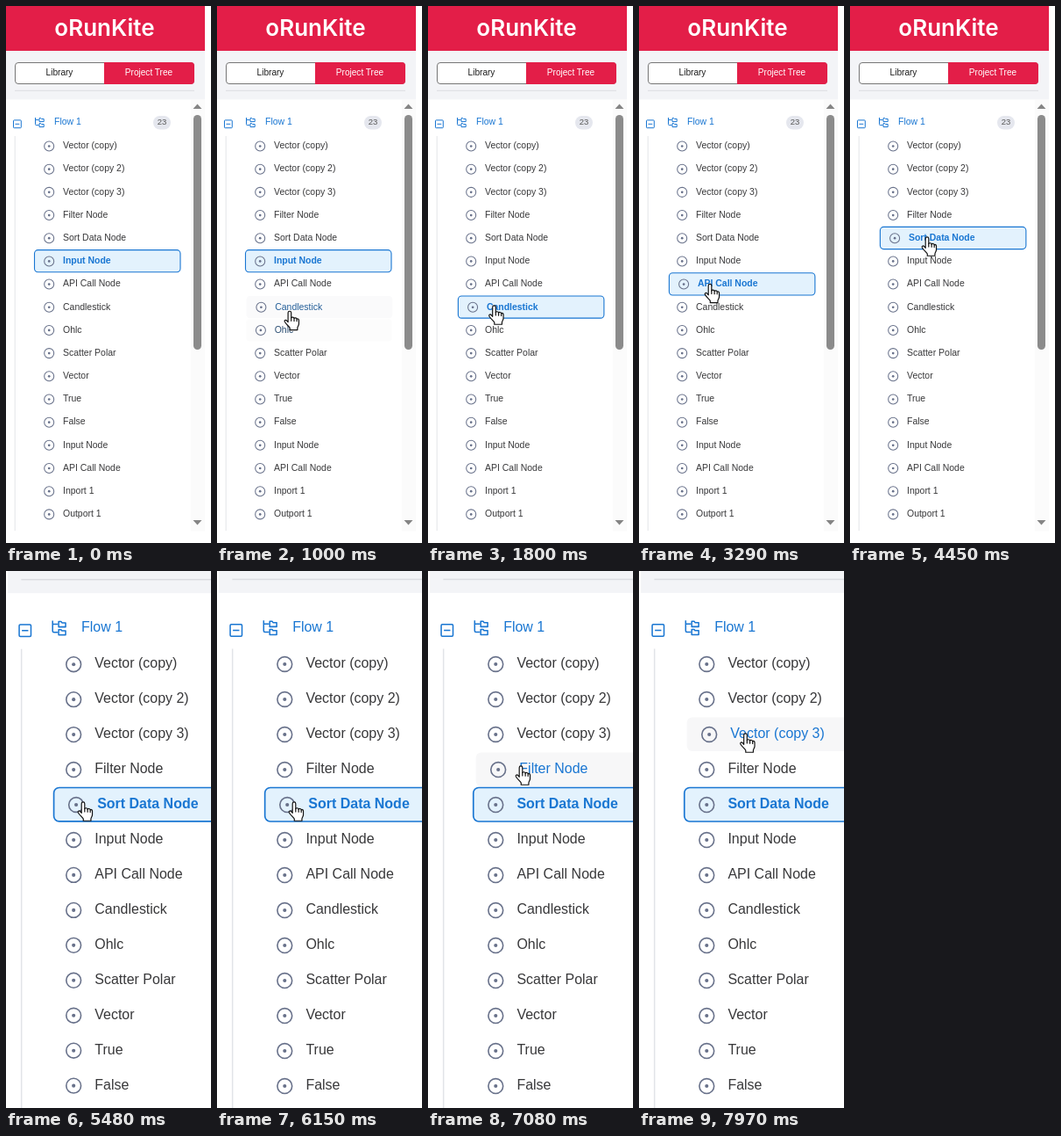
Write an HTML page that moves like this. It is 234 by 611 pixels and loops after 8 s.

```html
<!DOCTYPE html>
<html lang="en">
<head>
<meta charset="utf-8">
<title>Project tree</title>
<style>
  html, body { margin: 0; width: 100%; height: 100%; overflow: hidden; background: #fff; }
  svg { display: block; width: 234px; height: 611px; }
  text { font-family: "Liberation Sans", Arial, sans-serif; font-size: 10.47px; fill: #333; white-space: pre; }
  .title { font: 600 26px Inter, sans-serif; fill: #fff; }
  .mid { text-anchor: middle; }
  .tab { font-size: 10.1px; fill: #1c1c1c; }
  .blue { fill: #1976d2; }
  .line { fill: none; stroke: #1976d2; stroke-width: 1; stroke-linejoin: round; }
</style>
</head>
<body>
<svg viewBox="0 0 234 611">
  <g id="page">
    <rect y="51" width="227" height="55.4" fill="#f3f4f7"/>
    <rect width="227" height="51" fill="#e31e48"/>
    <text class="title mid" x="112.5" y="33.5">oRunKite</text>

    <rect x="10.5" y="64.5" width="204" height="24" rx="3.5" fill="#fff" stroke="#777"/>
    <path d="M112 64h99a4 4 0 0 1 4 4v17a4 4 0 0 1-4 4h-99z" fill="#e31e48"/>
    <text class="tab mid" x="61" y="79.3">Library</text>
    <text class="tab mid" x="163" y="79.3" style="fill:#fff">Project Tree</text>
    <path d="M10 96.3H215" stroke="#dcdde2"/>

    <rect x="211" y="106.4" width="16" height="491" fill="#fbfbfb"/>
    <rect x="214" y="124" width="9" height="267" rx="4.5" fill="#8b8b8b"/>
    <path d="M213.5 117l5-5.5 5 5.5zM213.5 585l5 5.5 5-5.5z" fill="#858585"/>

    <path d="M10.2 148V597" stroke="#e2e4e8"/>
    <rect class="line" x="8.5" y="129.9" width="8.8" height="8.8" rx=".8"/>
    <path class="line" d="M10.5 134.3h4.8"/>
    <g class="line">
      <path d="M33.5 127v7.6q0 1 1 1h3M33.5 129.6h4"/>
      <path id="folder" d="M38 127.6h1.8l.7.9h2.7v3.1H38z"/>
      <use href="#folder" y="6"/>
    </g>
    <text class="blue" x="55" y="135.4">Flow 1</text>
    <rect x="168" y="125" width="20" height="15.5" rx="7.7" fill="#e5e7ee"/>
    <text class="mid" x="178" y="135.4" style="font-size:9.5px;fill:#555">23</text>
    <g id="rows"></g>
  </g>
  <circle id="ripple" r="0" fill="#888"/>
  <g id="cursor" fill="#fff" stroke="#111" stroke-width="1.25" stroke-linejoin="round" stroke-linecap="round">
    <g transform="scale(.95)">
      <path d="M-1.9 13V1.8a1.9 1.9 0 0 1 3.8 0V8c.4-1.3 3.1-1.2 3.5.5.6-1.1 2.9-.8 3.2.8.8-.8 2.5-.4 2.5 1.5V15c0 2.2-1.5 3.2-1.7 5v2.4H.3V20C-1 18-4 15.8-5.9 12.6c-.8-1.6 1-2.8 2.3-1.6z"/>
      <path fill="none" d="M1.9 8v3.6M5.4 8.8v3M8.6 9.6v2.4"/>
    </g>
  </g>
</svg>
<script>
const LOOP = 8000, TOP = 159, PITCH = 26.18, SHIFT = 1.9, FADE = 120;
const names = ["Vector (copy)", "Vector (copy 2)", "Vector (copy 3)", "Filter Node", "Sort Data Node",
  "Input Node", "API Call Node", "Candlestick", "Ohlc", "Scatter Polar", "Vector", "True", "False",
  "Input Node", "API Call Node", "Inport 1", "Outport 1"];

// start, end, from x, from y, to x, to y
const moves = [
  [500, 1200, 156, 410, 75.5, 341],
  [2080, 2540, 75.5, 341, 81, 316.5],
  [3240, 3980, 81, 316.5, 88, 263],
  [6430, 7080, 88, 263, 106, 222],
  [7370, 7950, 106, 222, 121.5, 185]
];
const clicks = [1320, 2680, 4100];
// time, selected row
const picks = [[-1000, 5], [1640, 7], [2940, 6], [4300, 4]];

const $ = id => document.getElementById(id);
const clamp = v => Math.min(1, Math.max(0, v));
const span = (t, a, b) => clamp((t - a) / (b - a));
const inOut = u => u < .5 ? 4 * u ** 3 : 1 - (2 - 2 * u) ** 3 / 2;
const outExpo = u => u >= 1 ? 1 : 1 - 2 ** (-10 * u);
const mix = (a, b, u) => a + (b - a) * u;
const blend = (a, b, u) => `rgb(${a.map((v, i) => Math.round(mix(v, b[i], u)))})`;
const INK = [56, 56, 58], BLUE = [25, 118, 210];

function add(parent, tag, attrs) {
  const el = document.createElementNS("http://www.w3.org/2000/svg", tag);
  for (const k in attrs) el.setAttribute(k, attrs[k]);
  return parent.appendChild(el);
}

const rows = names.map((name, i) => {
  const y = TOP + i * PITCH;
  const g = add($("rows"), "g", {});
  const box = { x: 32.5, y: y - 12.3, width: 166.5, height: 25.2, rx: 4 };
  const hover = add(g, "rect", { ...box, fill: "#f7f7f8" });
  const mark = add(g, "rect", { ...box, fill: "#e3f2fd", stroke: "#1976d2", "stroke-width": 1.1 });
  add(g, "circle", { cx: 49.2, cy: y + .5, r: 5.5, fill: "none", stroke: "#68718a", "stroke-width": 1.05 });
  add(g, "circle", { cx: 49.2, cy: y + .5, r: 1.35, fill: "#68718a" });
  const label = add(g, "text", { x: 65, y: y + 3.3 });
  label.textContent = name;
  return { g, hover, mark, label };
});

function cursorAt(t) {
  if (t < moves[0][0]) return null;
  const [a, b, x0, y0, x1, y1] = moves.filter(m => t >= m[0]).pop();
  const u = inOut(span(t, a, b));
  return [mix(x0, x1, u), mix(y0, y1, u)];
}

function cameraAt(t) {
  const p = outExpo(span(t, 4886, 5620));
  return { s: 1 + .528 * p, x: 2.1 * p, y: -137.7 * p };
}

function hoveredAt(t) {
  const pos = cursorAt(t);
  if (!pos) return -1;
  const cam = cameraAt(t);
  return Math.round(((pos[1] - cam.y) / cam.s - TOP - .5) / PITCH);
}

const pickAt = t => picks.filter(p => t >= p[0]).pop()[1];

// Averaging a state over the last moments gives its linear transition.
function fade(state, t) {
  const out = new Array(names.length).fill(0), n = 8;
  for (let k = 0; k < n; k++) {
    const i = state(t - k * FADE / n);
    if (i in out) out[i] += 1 / n;
  }
  return out;
}

function draw(t) {
  const cam = cameraAt(t);
  $("page").setAttribute("transform", `translate(${cam.x} ${cam.y}) scale(${cam.s})`);

  const hover = fade(hoveredAt, t), picked = fade(pickAt, t), now = pickAt(t);
  rows.forEach((r, i) => {
    r.g.setAttribute("transform", `translate(${SHIFT * hover[i]} 0)`);
    r.hover.setAttribute("opacity", hover[i]);
    r.mark.setAttribute("opacity", picked[i]);
    r.label.style.fill = blend(INK, BLUE, Math.max(hover[i], picked[i]));
    r.label.style.fontWeight = i === now ? 700 : 400;
  });

  const pos = cursorAt(t);
  $("cursor").style.display = pos ? "" : "none";
  if (pos) $("cursor").setAttribute("transform", `translate(${pos})`);

  const start = clicks.find(c => t >= c && t < c + 140);
  const ripple = $("ripple");
  ripple.style.display = start ? "" : "none";
  if (start) {
    const u = span(t, start, start + 140);
    ripple.setAttribute("transform", `translate(${pos})`);
    ripple.setAttribute("r", mix(6, 12, u));
    ripple.setAttribute("opacity", .3 * (1 - u));
  }
}

const begin = performance.now();
function tick() {
  draw((performance.now() - begin) % LOOP);
  requestAnimationFrame(tick);
}
tick();
</script>
</body>
</html>
```
